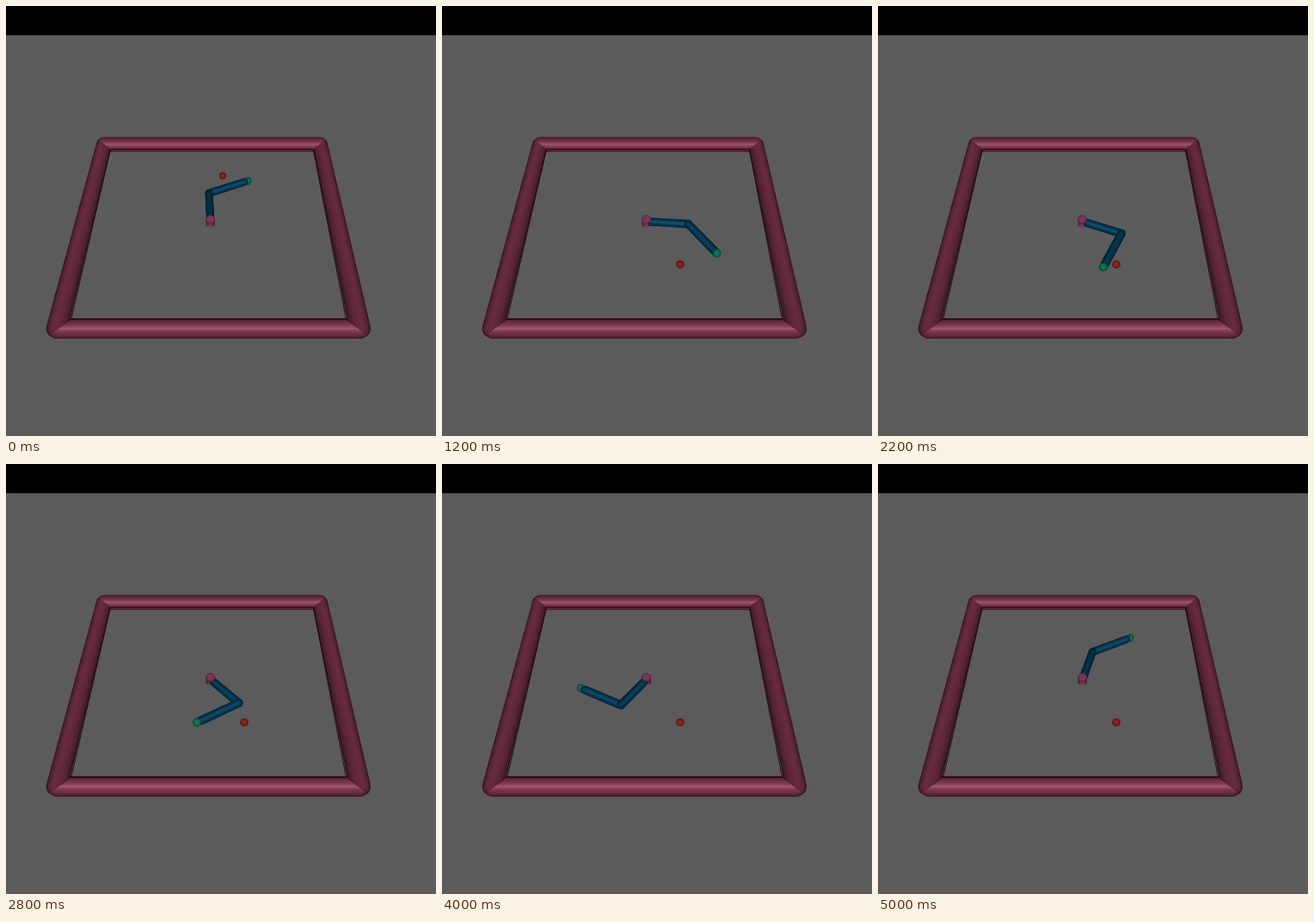
These frames come from a looping animation (500 by 500 pixels, 5100 ms). An HTML page with a canvas:

```html
<!DOCTYPE html>
<html>
<head>
<meta charset="utf-8">
<style>
  html, body { margin: 0; width: 100%; height: 100%; overflow: hidden; background: #000; }
  canvas { display: block; }
</style>
</head>
<body>
<canvas id="stage" width="500" height="500"></canvas>
<script>
const ctx = document.getElementById('stage').getContext('2d');
const LOOP = 5100, STEP = 100;
const PINK = [150, 62, 94], BLUE = [4, 76, 112], GREEN = [12, 150, 112], RED = [185, 42, 40];
const rad = deg => deg * Math.PI / 180;

// Perspective view of the floor plane: world metres to pixels, plus local scale
function project([x, y]) {
  const w = 1 + 0.544 * y;
  return { x: (486.6 * x + 136 * y + 237.8) / w, y: (250.5 - 210.7 * y) / w, scale: 486.6 / w };
}

const along = ([x, y], angle, d) => [x + d * Math.cos(angle), y + d * Math.sin(angle)];

// Shaded, tapered capsule made of nested layers; equal ends give a ball.
// lean moves the lit ridge sideways, as a fraction of the radius.
function capsule(from, to, radius, color, spec = 30, lean = 0) {
  const a = project(from), b = project(to);
  const angle = Math.atan2(b.y - a.y, b.x - a.x), quarter = Math.PI / 2;
  const flat = Math.cos(angle) ** 2;
  for (let i = 0; i < 12; i++) {
    const u = i / 12, r = radius * (1 - u), shift = lean * radius * u;
    const light = (0.34 + 0.48 * Math.sqrt(1 - (1 - u) ** 2)) * (0.8 + 0.2 * flat);
    ctx.fillStyle = `rgb(${color.map(c => Math.round(c * light + spec * flat * u ** 4))})`;
    ctx.beginPath();
    ctx.arc(a.x + shift * a.scale, a.y, r * a.scale, angle + quarter, angle + 3 * quarter);
    ctx.arc(b.x + shift * b.scale, b.y, r * b.scale, angle - quarter, angle + quarter);
    ctx.fill();
  }
}

function tracePath(points) {
  points.forEach(({ x, y }, i) => i ? ctx.lineTo(x, y) : ctx.moveTo(x, y));
  ctx.closePath();
}

function drawArena() {
  ctx.fillStyle = '#000';
  ctx.fillRect(0, 0, 500, 34);
  ctx.fillStyle = '#5b5b5b';
  ctx.fillRect(0, 34, 500, 466);

  const s = 0.3, near = 0.303;
  capsule([-s, s], [s, s], 0.0203, PINK, 46);
  capsule([-near, -s], [near, -s], 0.0203, PINK, 46);

  // Side rails, mitred along the diagonals of the frame
  ctx.save();
  ctx.beginPath();
  for (const x of [-0.4, 0.4]) tracePath([[0, 0], [x, 0.4], [x, -0.4]].map(project));
  ctx.clip();
  for (const side of [-1, 1]) capsule([side * s, s], [side * near, -s], 0.0213, PINK, 46, side * 0.35);
  ctx.restore();

  ctx.strokeStyle = '#1c0a12';
  ctx.beginPath();
  const e = 0.279;
  tracePath([[-e, e], [e, e], [e, -e], [-e, -e]].map(project));
  ctx.stroke();
}

function drawRootBody() {
  const g = ctx.createLinearGradient(232, 0, 243, 0);
  g.addColorStop(0, '#4a1f2f');
  g.addColorStop(0.5, '#7d3850');
  g.addColorStop(1, '#4a1f2f');
  ctx.fillStyle = g;
  ctx.beginPath();
  ctx.roundRect(232.4, 247, 10.6, 9.5, [0, 0, 3, 3]);
  ctx.fill();
}

function drawRootTop() {
  ctx.fillStyle = '#7c3452';
  ctx.strokeStyle = '#54233a';
  ctx.beginPath();
  ctx.ellipse(237.7, 248, 4.9, 4.5, 0, 0, 7);
  ctx.fill();
  ctx.stroke();
}

function drawArm(shoulder, bend) {
  const first = rad(shoulder), second = rad(shoulder + bend);
  const elbow = along([0, 0], first, 0.1);
  const upper = () => capsule(along([0, 0], first, 0.012), elbow, 0.0097, BLUE);
  const tip = along(elbow, second, 0.11);
  const parts = [
    () => capsule(elbow, along(elbow, second, 0.1), 0.0097, BLUE),
    () => capsule(tip, tip, 0.0097, GREEN, 10)
  ];
  if (Math.sin(second) > 0.1) parts.reverse();
  const lower = () => parts.forEach(draw => draw());

  // Far pieces first
  const rising = elbow[1] > -0.005, behind = tip[1] > elbow[1];
  if (!rising) drawRootBody();
  (behind ? [lower, upper] : [upper, lower]).forEach(draw => draw());
  if (rising) drawRootBody();
  drawRootTop();
}

// Seconds, shoulder angle, elbow bend
const KEYS = [
  [0.1, 3, 1], [0.6, 0.8, -20.8], [1.2, -5, -51.7], [2.2, -23.4, -90.1], [3.3, -76, -100],
  [4.0, -124.8, -84], [4.2, -139.5, -78], [4.5, -170, -65], [4.8, -227, -50], [5.0, -283.8, -47.4]
];

function slope(i, n) {
  const a = KEYS[Math.max(i - 1, 0)], b = KEYS[Math.min(i + 1, KEYS.length - 1)];
  return (b[n] - a[n]) / (b[0] - a[0]);
}

// Cubic Hermite through the keys
function joint(t, n) {
  let i = 0;
  while (i < KEYS.length - 2 && t > KEYS[i + 1][0]) i++;
  const a = KEYS[i], b = KEYS[i + 1], span = b[0] - a[0];
  const u = (t - a[0]) / span, v = 1 - u;
  return v * v * (1 + 2 * u) * a[n] + u * u * (3 - 2 * u) * b[n]
    + span * u * v * (v * slope(i, n) - u * slope(i + 1, n));
}

function draw(now) {
  const t = Math.floor((now % LOOP) / STEP) * STEP / 1000;
  const reset = t < 0.1;
  drawArena();
  const goal = reset ? [0.0295, 0.1666] : [0.0766, -0.1336];
  capsule(goal, goal, 0.009, RED, 8);
  if (reset) drawArm(93, -67.7);
  else drawArm(joint(t, 1), joint(t, 2));
  requestAnimationFrame(() => draw(performance.now() - start));
}

const start = performance.now();
draw(0);
</script>
</body>
</html>
```
